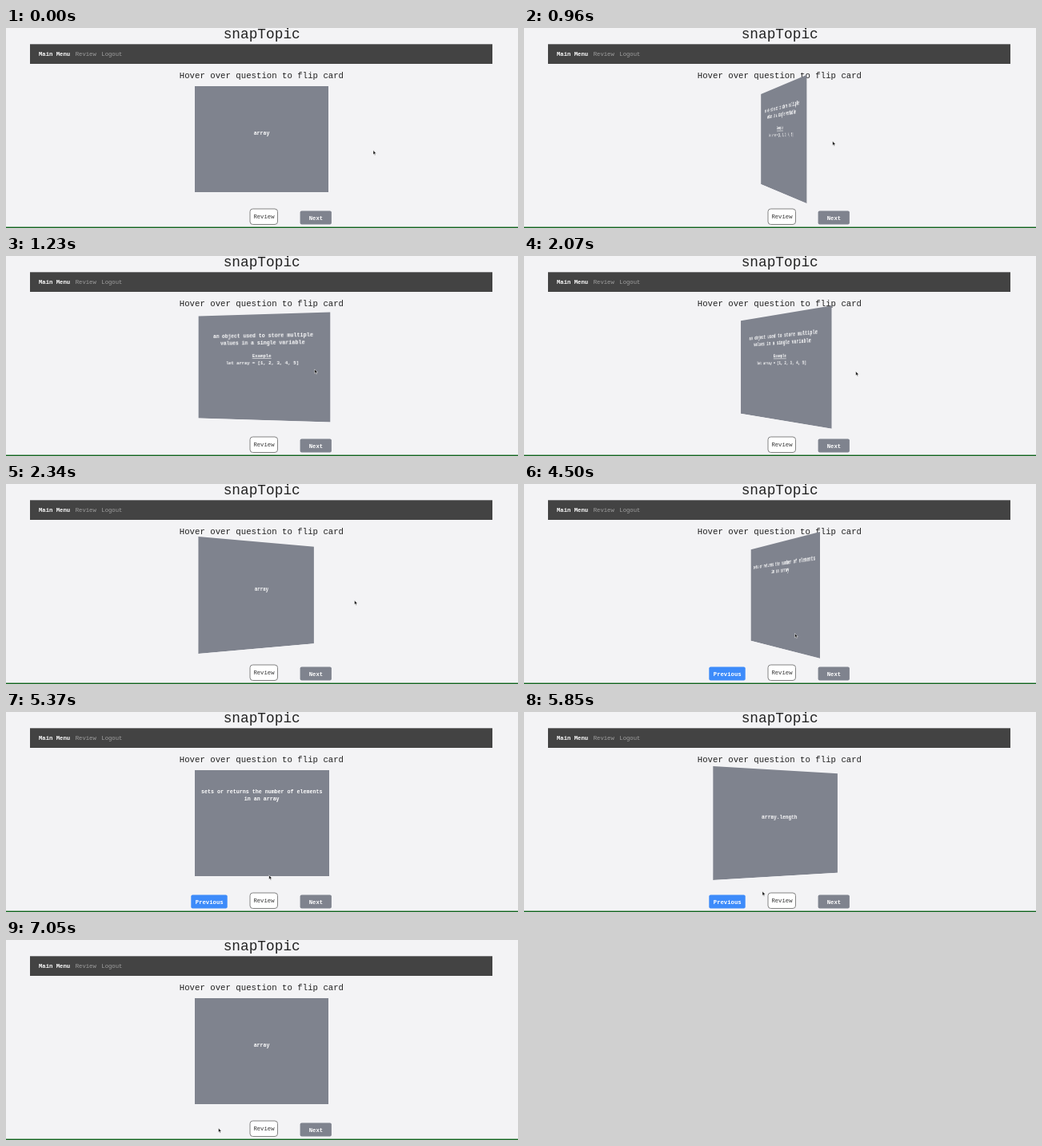
An HTML page that plays this animation: 640 by 251 pixels, repeating every 7.08 s.

```html
<!DOCTYPE html>
<html lang="en">
<head>
<meta charset="utf-8">
<title>Flash cards</title>
<style>
html, body { margin: 0; width: 100%; height: 100%; overflow: hidden; background: #f3f3f5; }
svg { position: absolute; left: 0; top: 0; font-family: "Courier New", "Liberation Mono", monospace; }
.bold { font-weight: bold; fill: #fff; }
.menu { font-size: 7.25px; }
.big { font-size: 6.65px; }
.small { font-size: 5.75px; }
.face text { text-anchor: middle; }
#scene { position: absolute; left: 235.5px; top: 73px; width: 167.5px; height: 133px; perspective: 450px; }
#card { width: 100%; height: 100%; transform-style: preserve-3d; }
.face { width: 100%; height: 100%; background: #7f838e; backface-visibility: hidden; }
.back { transform: rotateY(180deg); }
</style>
</head>
<body>
<svg width="640" height="251">
  <text x="271.7" y="12.8" font-size="17.8" fill="#222">snapTopic</text>
  <rect x="30" y="20.3" width="578" height="24.7" fill="#434343"/>
  <g class="menu">
    <text x="41" y="35.3" class="bold">Main Menu</text>
    <text x="86.7" y="35.3" fill="#a0a0a0">Review</text>
    <text x="119.3" y="35.3" fill="#a0a0a0">Logout</text>
  </g>
  <text x="216.8" y="63" font-size="10.7" fill="#222">Hover over question to flip card</text>
  <g class="menu">
    <g id="prev">
      <rect x="231.3" y="229.5" width="45.4" height="17" rx="2"/>
      <text x="236.8" y="240.8" class="bold">Previous</text>
    </g>
    <rect x="305" y="227" width="34.5" height="19.5" rx="3.5" fill="#fff" stroke="#666" stroke-width=".8"/>
    <text x="309.4" y="239.3" fill="#333">Review</text>
    <rect id="next" x="367.6" y="229.5" width="39.3" height="17" rx="2"/>
    <text x="378.7" y="240.8" class="bold">Next</text>
  </g>
  <rect y="249.6" width="640" height="1.4" fill="#12641f"/>
</svg>

<div id="scene"><div id="card">
  <svg class="face"><text id="question" x="83.6" y="61.2" class="bold big"></text></svg>
  <svg class="face back">
    <g id="answer1" class="bold">
      <text x="83.7" y="29" class="big">an object used to store multiple</text>
      <text x="83.7" y="38.3" class="big">values in a single variable</text>
      <text x="83.7" y="54.4" class="small" text-decoration="underline">Example</text>
      <text x="83.7" y="62.8" class="small">let array = [1, 2, 3, 4, 5]</text>
    </g>
    <g id="answer2" class="bold">
      <text x="83.7" y="29" class="big">sets or returns the number of elements</text>
      <text x="83.7" y="38.3" class="big">in an array</text>
    </g>
  </svg>
</div></div>

<svg width="640" height="251"><g id="pointer" stroke-linejoin="round">
  <path id="arrow" d="M0 0V5.4L1.2 4.3 2 6.2 2.9 5.8 2.1 4H3.8Z" fill="#111" stroke="#fff" stroke-width=".5"/>
  <path id="hand" d="M-.7 0Q0-.8 .6 0V2L3 2.6Q3.6 3 3.3 4L2.7 5.8H-.3L-2 3.4Q-1.6 2.6-.7 3.2Z" fill="#fff" stroke="#111" stroke-width=".6"/>
</g></svg>

<script>
const LOOP = 7080, FLIP = 800, NEXT_CLICK = 3240, PREV_CLICK = 6750;
// [time, angle reached after the flip]
const flips = [[680, 180], [1920, 0], [4190, 180], [5380, 0]];
// [time, x, y] of the pointer tip
const path = [
  [90, 459, 153.5], [400, 434, 150], [680, 403, 146], [850, 385.7, 142], [1700, 385.7, 142],
  [1920, 403, 144], [2340, 435.5, 146], [2480, 437, 152], [2900, 393.5, 239.5], [3850, 393.5, 239.5],
  [4190, 350, 206], [4400, 338.5, 187.5], [5250, 338.5, 187.5], [5380, 328, 206],
  [5850, 298, 225], [6250, 265.5, 236]
];
const $ = id => document.getElementById(id);
const show = (id, on) => $(id).style.display = on ? "" : "none";

// CSS "ease": cubic-bezier(.25, .1, .25, 1)
function ease(x) {
  if (x >= 1) return 1;
  let lo = 0, hi = 1, s = .5;
  for (let i = 0; i < 20; i++) {
    s = (lo + hi) / 2;
    if (.75 * s * (1 - s) + s ** 3 < x) lo = s; else hi = s;
  }
  return .3 * s * (1 - s) ** 2 + 3 * s * s * (1 - s) + s ** 3;
}

function angleAt(t) {
  let angle = 0;
  for (const [start, end] of flips)
    if (t > start) angle += (end - angle) * ease((t - start) / FLIP);
  return angle;
}

function pointerAt(t) {
  const i = path.findIndex(p => p[0] > t);
  if (i === 0) return path[0].slice(1);
  if (i < 0) return path[path.length - 1].slice(1);
  const a = path[i - 1], b = path[i], k = (t - a[0]) / (b[0] - a[0]);
  return [a[1] + (b[1] - a[1]) * k, a[2] + (b[2] - a[2]) * k];
}

function draw(now) {
  const t = now % LOOP, second = t >= NEXT_CLICK && t < PREV_CLICK;
  const [x, y] = pointerAt(t);
  const inRow = y > 229.5 && y < 246.5;
  const onNext = inRow && x > 367.6 && x < 407;
  const onPrev = second && inRow && x > 231.3 && x < 276.7;

  $("card").style.transform = `rotateY(${angleAt(t)}deg)`;
  $("question").textContent = second ? "array.length" : "array";
  show("answer1", !second);
  show("answer2", second);
  show("prev", second);
  $("prev").setAttribute("fill", onPrev ? "#2f74dc" : "#3d8bfa");
  $("next").setAttribute("fill", onNext ? "#666a75" : "#7f838e");
  show("hand", onNext || onPrev);
  show("arrow", !onNext && !onPrev);
  $("pointer").setAttribute("transform", `translate(${x} ${y})`);
  requestAnimationFrame(draw);
}
requestAnimationFrame(draw);
</script>
</body>
</html>
```
